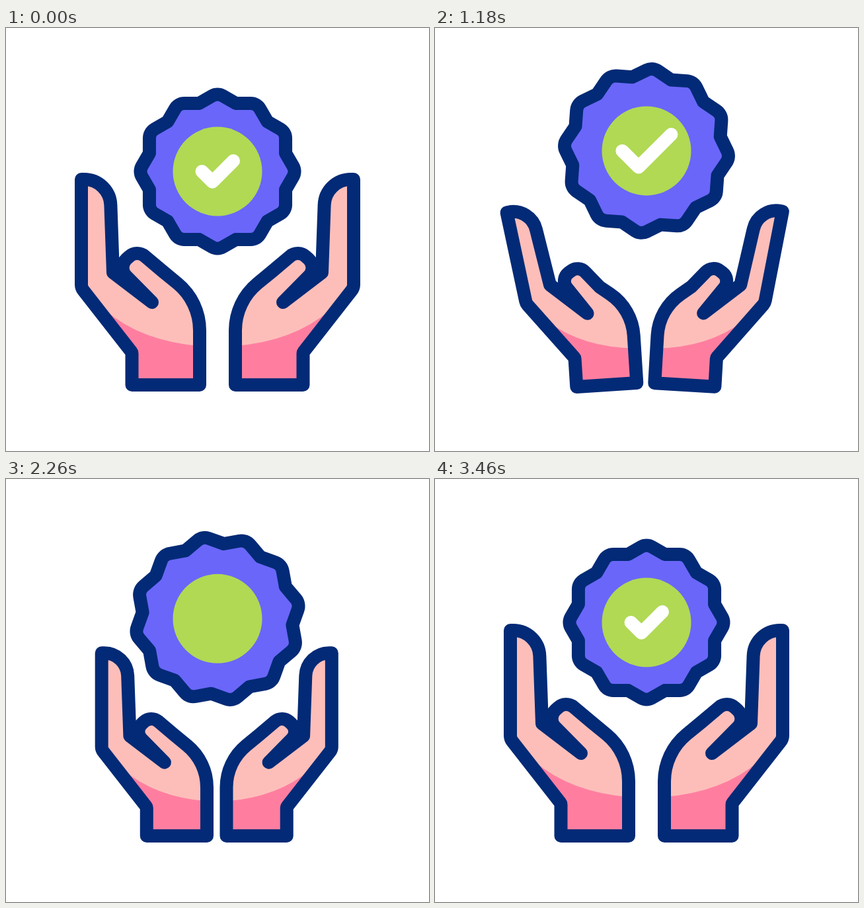
An HTML page with a canvas that plays this animation: 640 px wide and 640 px high, repeating every 3.6 s.

```html
<!DOCTYPE html>
<html lang="en">
<head>
<meta charset="utf-8">
<title>Hands and badge</title>
<style>
html, body { margin: 0; height: 100%; overflow: hidden; background: #fff; }
canvas { display: block; width: 100%; height: 100%; }
</style>
</head>
<body>
<canvas width="640" height="640"></canvas>
<script>
const ctx = document.querySelector('canvas').getContext('2d');
const LOOP = 3600, START = 220, END = 3460, DEG = Math.PI / 180;
const NAVY = '#032a76', SKIN = '#fdbeb9', SHADE = '#ff7ea0', PURPLE = '#6a66f9', GREEN = '#b1d954';

// Left hand corners at rest: x, y, corner radius
const FINGER = [[114, 310], [114, 229], [157, 229, 40], [162, 370]];
const THUMB = [[221, 415], [168.7, 362, 18], [198, 335, 18], [237, 368]];
const PALM = [[293, 414, 92], [293, 540], [190.5, 540], [190.5, 491, 4], [114, 393, 14]];
const CREASE = [[150, 427], [205, 474], [293, 481]];
const CHECK = [[-23.5, 0], [-7.7, 15.7], [24, -16]];
const CHECK_LEN = Math.SQRT2 * (15.8 + 31.7);

const clamp = u => Math.min(1, Math.max(0, u));
const smooth = u => u * u * (3 - 2 * u);
const rise = (t, from, to) => smooth(clamp((t - from) / (to - from)));
const hump = (t, mid, half) => smooth(clamp(1 - Math.abs(t - mid) / half));

// Bezier easing with handles (x1, 0) and (x2, 1)
function bezier(x, x1, x2) {
  let lo = 0, hi = 1;
  for (let i = 0; i < 24; i++) {
    const s = (lo + hi) / 2;
    const at = 3 * x1 * s * (1 - s) ** 2 + 3 * x2 * s * s * (1 - s) + s ** 3;
    if (at < x) lo = s; else hi = s;
  }
  return smooth(lo);
}

// Counterclockwise turn about (cx, cy); keeps the corner radius
function turn([x, y, r = 0], cx, cy, degrees, size = 1) {
  const c = Math.cos(degrees * DEG) * size, s = Math.sin(degrees * DEG) * size;
  x -= cx;
  y -= cy;
  return [cx + x * c + y * s, cy + y * c - x * s, r];
}

function roundedPath(points) {
  ctx.beginPath();
  points.forEach(([x, y, r], i) => {
    const next = points[(i + 1) % points.length];
    if (i) ctx.arcTo(x, y, next[0], next[1], r);
    else ctx.moveTo(x, y);
  });
  ctx.closePath();
}

function paint(fill) {
  ctx.fillStyle = fill;
  ctx.fill();
}

function drawHand(scale, open) {
  const place = p => {
    const [x, y, r] = turn(p, 241.5, 540, 7 * open);
    return [393 + (x + 3 * open - 393) * scale - 100 * 0 + (1 - scale) * 0, 540 + (y - 540) * scale, r * scale];
  };
  const palm = PALM.map(place);
  const outline = [
    ...FINGER.map(p => place(turn(p, 114, 393, 16 * open, 1 - 0.07 * open))),
    ...THUMB.map(p => place(turn(p, 209, 390, -18 * open))),
    ...palm
  ];
  const [a, b, c] = CREASE.map(place);
  roundedPath(outline);
  paint(SKIN);

  ctx.beginPath();
  ctx.moveTo(a[0], a[1]);
  ctx.quadraticCurveTo(b[0], b[1], c[0], c[1]);
  palm.slice(1, 4).forEach(p => ctx.lineTo(p[0], p[1]));
  paint(SHADE);

  roundedPath(outline);
  ctx.stroke();
}

// Two crossed hexagons with rounded tips
function drawBadge(scale, angle) {
  const points = [];
  for (let i = 0; i < 25; i++) {
    const tip = i % 2;
    const r = scale * (tip ? 119 : 106.7);
    const a = angle + (i - 7) * 15 * DEG;
    points.push([r * Math.cos(a), r * Math.sin(a), tip * 16 * scale]);
  }
  roundedPath(points);
  paint(PURPLE);
  ctx.stroke();
  ctx.beginPath();
  ctx.arc(0, 0, 67.5, 0, 2 * Math.PI);
  paint(GREEN);
}

function drawCheck(scale, from, to) {
  if (from >= to) return;
  const len = CHECK_LEN * scale;
  ctx.beginPath();
  CHECK.forEach(([x, y]) => ctx.lineTo(x * scale, y * scale));
  ctx.strokeStyle = '#fff';
  if (to - from < 1) {
    ctx.setLineDash([len * (to - from), 999]);
    ctx.lineDashOffset = -len * from;
  }
  ctx.stroke();
  ctx.setLineDash([]);
}

function draw(now) {
  const t = now % LOOP;
  ctx.fillStyle = '#fff';
  ctx.fillRect(0, 0, 640, 640);
  ctx.lineWidth = 20;
  ctx.lineJoin = ctx.lineCap = 'round';
  ctx.strokeStyle = NAVY;

  const active = rise(t, START, 620) - rise(t, 2740, END);
  const open = 1.14 * (rise(t, 930, 1460) - rise(t, 1460, 2250) + rise(t, 2270, 2740) - rise(t, 2740, END));
  const scale = 1 - 0.11 * active;
  drawHand(scale, open);
  ctx.save();
  ctx.translate(640 - 2.5 * active, 0);
  ctx.scale(-1, 1);
  drawHand(scale, open * 0.91);
  ctx.restore();

  const lift = 32 * hump(t, 1220, 385) + 32 * hump(t, 1990, 370) + 39 * hump(t, 3180, 255);
  const spin = Math.PI * bezier(clamp((t - START) / (END - START)), 0.32, 0.81);
  ctx.save();
  ctx.translate(320, 217 - lift);
  drawBadge(1 + 0.066 * active, spin);
  if (t < 2300) drawCheck(1 + 0.56 * rise(t, START, 620), rise(t, 1280, 2000), 1);
  else drawCheck(1, 0, rise(t, 2620, 3340));
  ctx.restore();

  requestAnimationFrame(draw);
}
requestAnimationFrame(draw);
</script>
</body>
</html>
```
